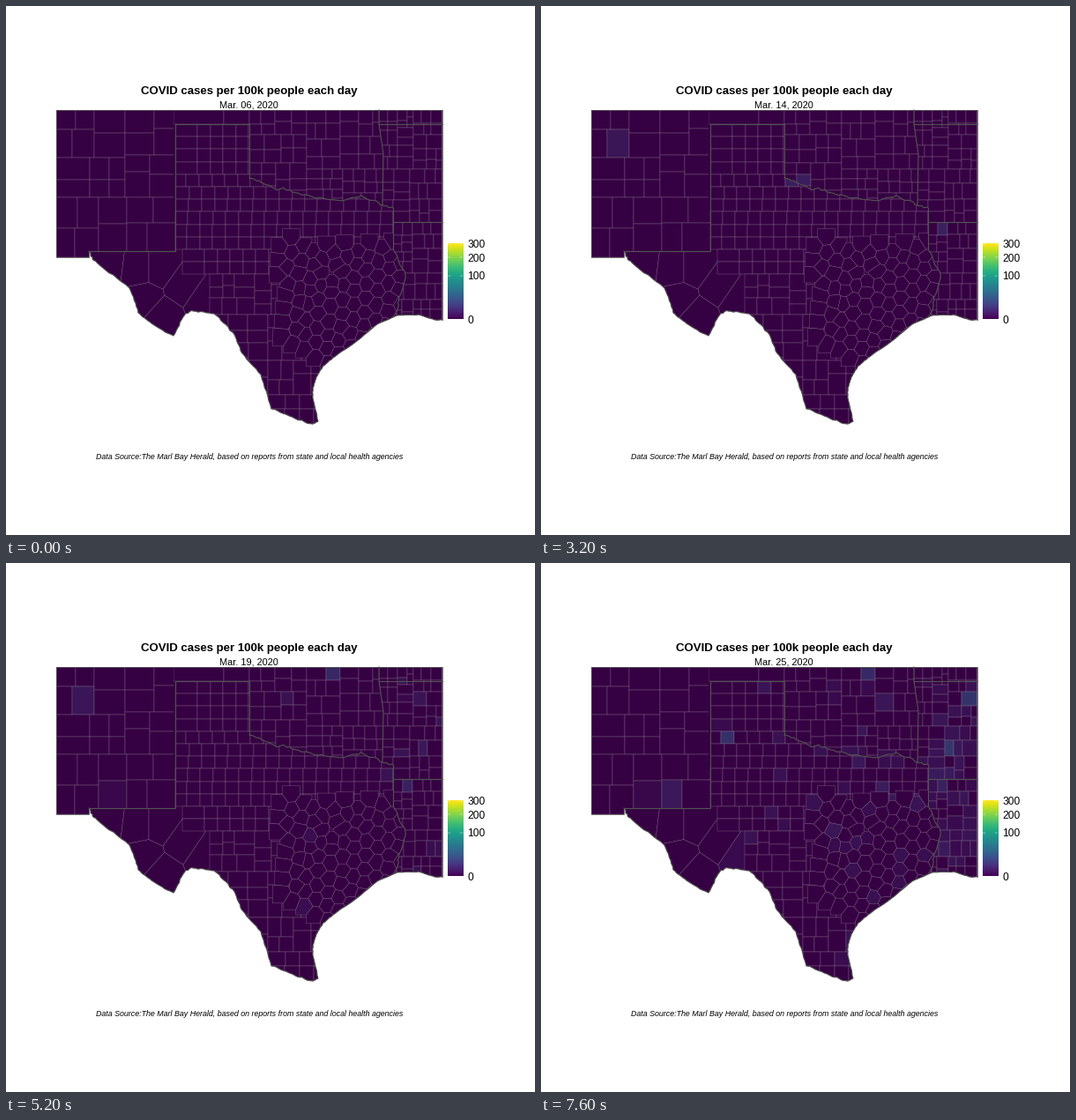
Recreate the animation shown at these times as a matplotlib script. Size 600 px wide and 600 px high, loop 8 s.

```python
import numpy as np
import matplotlib as mpl
import matplotlib.pyplot as plt
from matplotlib.animation import FuncAnimation
from matplotlib.collections import PolyCollection
from matplotlib.patches import Polygon
from matplotlib.path import Path

DAYS, INTERVAL = 20, 400
MAX_RATE = 300
VIRIDIS = mpl.colormaps["viridis"]
SHADE = 0.8
COUNTY = dict(edgecolors="#87768b", linewidths=0.35)
STATE = dict(color="#50544f", lw=1.15, solid_joinstyle="round")
FRAME = dict(color="#50544f", lw=0.8)

LEFT, RIGHT, TOP = 57, 494.5, 118
STEP = 14.2  # usual county size in pixels

rng = np.random.default_rng(36)
plt.rcParams["font.family"] = "Liberation Sans"
fig = plt.figure(figsize=(600 / 72, 600 / 72), dpi=72, facecolor="white")
ax = fig.add_axes([0, 0, 1, 1])
ax.axis("off")


# ---- geometry helpers ----
def roughen(points, amount, rounds=3):
    """Add displaced midpoints so a line reads as a river or shore."""
    pts = np.array(points, float)
    for _ in range(rounds):
        step = np.diff(pts, axis=0)
        normal = np.column_stack([-step[:, 1], step[:, 0]])
        normal /= np.linalg.norm(step, axis=1)[:, None]
        mids = pts[:-1] + step / 2 + normal * rng.normal(0, amount, (len(step), 1))
        out = np.empty((len(pts) + len(mids), 2))
        out[::2], out[1::2] = pts, mids
        pts = out
    return [tuple(p) for p in pts]


def rect(x0, y0, x1, y1):
    return [(x0, y0), (x1, y0), (x1, y1), (x0, y1)]


def split(x0, y0, x1, y1, size):
    """Cut a box again and again into uneven smaller boxes."""
    w, h = x1 - x0, y1 - y0
    if max(w, h) < size * 1.35:
        return [rect(x0, y0, x1, y1)]
    t = rng.uniform(0.4, 0.6)
    if w * rng.uniform(0.75, 1.3) > h:
        m = x0 + w * t
        return split(x0, y0, m, y1, size) + split(m, y0, x1, y1, size)
    m = y0 + h * t
    return split(x0, y0, x1, m, size) + split(x0, m, x1, y1, size)


def rows(x0, x1, y0, count):
    """Rows of near-square counties, each row shifted a little."""
    cells = []
    for k in range(count):
        top = y0 + k * STEP
        first = x0 + (25 if k < 4 else rng.uniform(12, 16))
        edges = [x0, *np.arange(first, x1, STEP + 0.4), x1]
        cells += [rect(a, top, b, top + STEP) for a, b in zip(edges, edges[1:])]
    return cells


def cut(poly, mid, normal):
    out = []
    for a, b in zip(poly, poly[1:] + poly[:1]):
        da, db = np.dot(np.subtract(a, mid), normal), np.dot(np.subtract(b, mid), normal)
        if da <= 0:
            out.append(a)
        if da * db < 0:
            t = da / (da - db)
            out.append((a[0] + t * (b[0] - a[0]), a[1] + t * (b[1] - a[1])))
    return out


def voronoi(sites, reach):
    cells = []
    for s in sites:
        poly = rect(*(s - reach), *(s + reach))
        for other in sites[np.argsort(np.hypot(*(sites - s).T))][1:13]:
            poly = cut(poly, (s + other) / 2, other - s)
        cells.append(poly)
    return cells


def tilted_sites(inside, angle=0.55):
    u, v = np.meshgrid(np.arange(-14, 15), np.arange(-14, 15))
    grid = np.column_stack([(u + v % 2 / 2).ravel(), v.ravel()]) * STEP
    c, s = np.cos(angle), np.sin(angle)
    pts = grid @ np.array([[c, s], [-s, c]]) + (370, 325)
    pts += rng.normal(0, 1.9, pts.shape)
    return pts[Path(inside).contains_points(pts)]


# ---- state borders ----
coast = roughen(
    [(443, 351), (421, 361), (398, 380), (371, 399), (360, 408), (352, 421),
     (348, 434), (348, 445), (354, 471), (348, 474)], 0.2)
rio = roughen(
    [(348, 474), (328, 468), (301, 457), (289, 418), (268, 394), (257, 370),
     (236, 349), (212, 346), (203, 350), (190, 374), (165, 360), (150, 348),
     (140, 320), (103, 291), (94, 278)], 0.5)
red = roughen(
    [(276, 195), (297, 203), (325, 211), (353, 218), (385, 220), (405, 216),
     (427, 226), (439, 229)], 0.8)
sabine = roughen([(439, 275), (453, 305), (447, 328), (443, 351)], 0.5)
gulf = roughen([(RIGHT, 356), (486, 356), (468, 350), (443, 351)], 0.2)
panhandle = [(94, 278), (192, 278), (192, 134), (276, 134), (276, 195)]
east_line = [(423, TOP), (423, 134), (428, 168), (427, 226)]

texas = panhandle + red + sabine + coast + rio
new_mexico = [(LEFT, TOP), (192, TOP), (192, 278), (94, 278), (94, 284.5), (LEFT, 284.5)]
oklahoma = rect(190, TOP, 430, 232)
arkansas = east_line + [(427, 246), (RIGHT, 246), (RIGHT, TOP)]
louisiana = [(438, 245), (RIGHT, 245)] + gulf

# ---- counties ----
heart = [(308, 262), (442, 262), (460, 300), (455, 360), (350, 415), (308, 375)]
ranges = np.array([(112, 295), (152, 300), (158, 330), (172, 300), (200, 320),
                   (180, 350), (222, 335)])
texas_cells = (voronoi(ranges, 60) + rows(192, 440, 134, 10) + rows(200, 320, 276, 2)
               + split(231, 304, 318, 350, 18) + split(220, 350, 362, 476, 18)
               + voronoi(tilted_sites(heart), 10))

# ---- spread of cases ----
METROS = np.array([(75, 140), (90, 265), (362, 248), (345, 300), (395, 350),
                   (350, 140), (465, 205), (485, 155), (450, 260), (480, 310)])
# x, y, first day, last day, cases per 100k
OUTBREAKS = [
    (88, 213, 3, 7, 5), (90, 165, 7, 15, 1.5), (157, 230, 14, 18, 3),
    (204, 169, 14, 16, 17), (213, 197, 14, 19, 9), (292, 194, 7, 9, 3),
    (365, 132, 13, 19, 6), (450, 258, 7, 19, 4), (462, 212, 16, 19, 12),
    (487, 160, 16, 19, 11)]


def color(rate):
    rgba = np.array(VIRIDIS(np.sqrt(np.asarray(rate) / MAX_RATE)))
    rgba[..., :3] *= SHADE
    return rgba


def spread(cells, base):
    """Daily rates: counties near a metro are likelier to report, most of them late."""
    rates = np.zeros((DAYS, len(cells)))
    for i, cell in enumerate(cells):
        near = np.hypot(*(METROS - np.mean(cell, axis=0)).T).min()
        if rng.random() < base + 0.6 * np.exp(-(near / 32) ** 2):
            start = DAYS - 1 - int(10 * rng.random() ** 2)
            stop = start + rng.integers(4, 10)
            rates[start:stop, i] = 0.8 * np.exp(rng.normal(0, 0.6))
    for x, y, first, last, rate in OUTBREAKS:
        hits = [i for i, c in enumerate(cells) if Path(c).contains_point((x, y))]
        if hits:
            rates[:, hits[-1]] = 0
            rates[first:last + 1, hits[-1]] = rate
    return rates


def add_state(border, cells, base):
    outline = Polygon(border, fc=color(0), ec="none")
    ax.add_patch(outline)
    art = PolyCollection(cells, **COUNTY)
    ax.add_collection(art, autolim=False)
    art.set_clip_path(outline)
    return art, spread(cells, base)


states = [
    add_state(new_mexico, split(LEFT, TOP, 192, 285, 31), 0),
    add_state(oklahoma, [rect(190, TOP, 247, 134), rect(247, TOP, 276, 134)]
              + split(276, TOP, 430, 232, 16), 0.04),
    add_state(arkansas, split(423, TOP, 496, 246, 14), 0.12),
    add_state(louisiana, split(438, 245, 496, 358, 14), 0.15),
    add_state(texas, texas_cells, 0.06),
]


def line(points, **style):
    ax.plot(*zip(*points), **style)


for border in (panhandle, red, sabine, coast, rio, gulf, east_line,
               [(439, 229), (439, 275)], [(423, 134), (RIGHT, 134)],
               [(439, 245), (RIGHT, 245)]):
    line(border, **STATE)
line([(94, 278), (94, 284.5), (LEFT, 284.5), (LEFT, TOP), (RIGHT, TOP), (RIGHT, 356)],
     **FRAME)

# ---- legend and text ----
BAR = (500.5, 518, 355.5, 269.5)
ax.imshow(np.linspace(1, 0, 256)[:, None], cmap=VIRIDIS, aspect="auto",
          extent=BAR, interpolation="bilinear")
ax.set(xlim=(0, 600), ylim=(600, 0))
for value in (0, 100, 200, 300):
    y = BAR[2] - (BAR[2] - BAR[3]) * np.sqrt(value / MAX_RATE)
    for x in (BAR[0], BAR[1] - 3.4):
        line([(x, y), (x + 3.4, y)], color="white", lw=0.4)
    ax.text(523, y + 4.4, str(value), size=12)

ax.text(275.5, 100, "COVID cases per 100k people each day", size=13.3,
        weight="bold", ha="center")
date = ax.text(275.8, 115.6, "", size=11, ha="center")
ax.text(276, 514, "Data Source:The Marl Bay Herald, based on reports from "
        "state and local health agencies", size=8.88, style="italic", ha="center")


def update(day):
    for art, rates in states:
        art.set_facecolors(color(rates[day]))
    date.set_text(f"Mar. {day + 6:02d}, 2020")
    return [art for art, _ in states] + [date]


anim = FuncAnimation(fig, update, frames=DAYS, interval=INTERVAL,
                     repeat=True, repeat_delay=0, blit=False)
plt.show()
```
